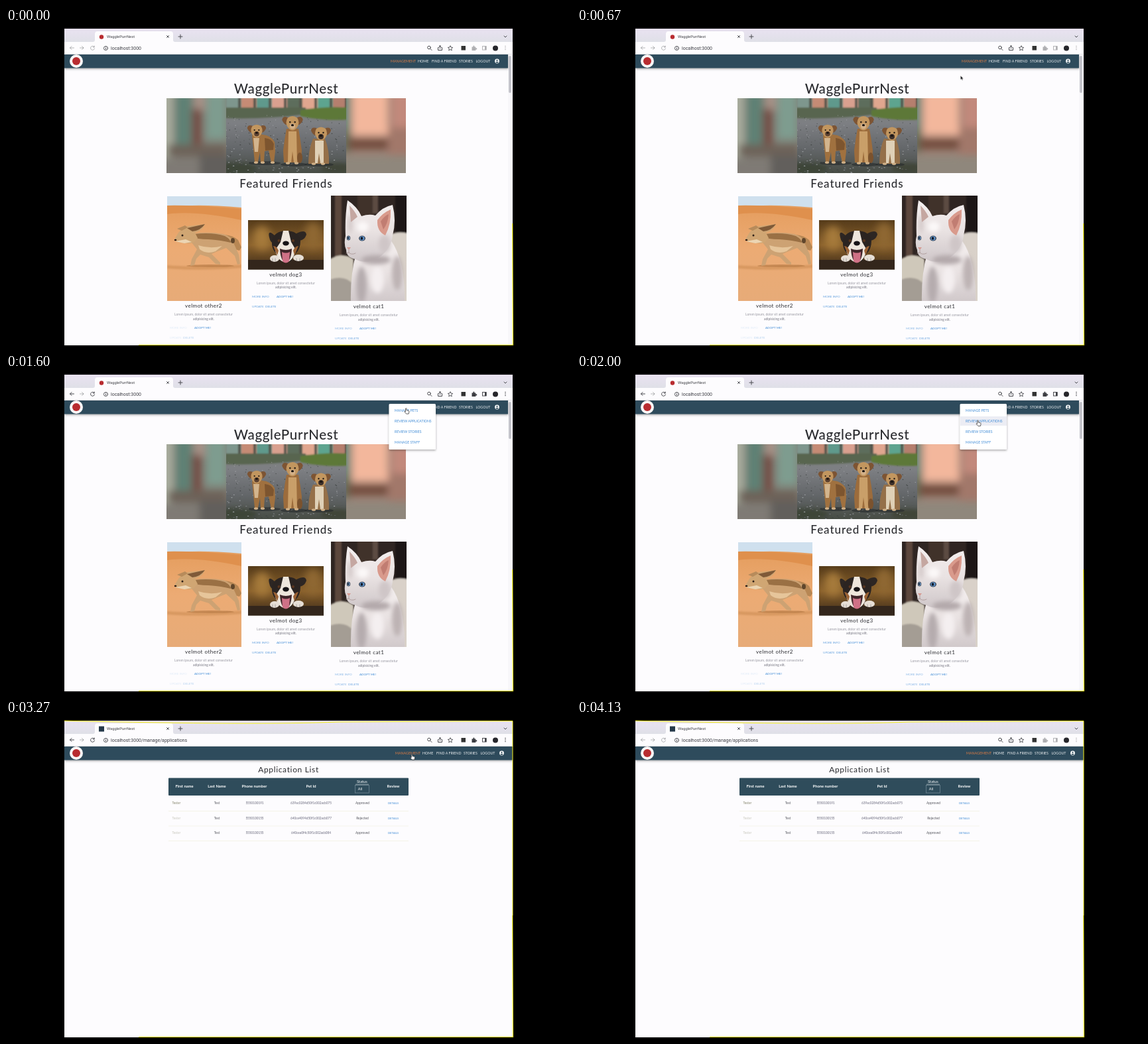
An HTML page for the animation above (4.19 s loop, 852 by 480 pixels).

```html
<!DOCTYPE html>
<html lang="en">
<head>
<meta charset="utf-8">
<title>Pet adoption walkthrough</title>
<style>
  html, body { margin: 0; width: 100%; height: 100%; overflow: hidden; background: #000; }
  svg { display: block; width: 100vw; height: 100vh; }
  text { font-family: Lato, "Open Sans", sans-serif; }
  .ui { font-family: Roboto, Inter, sans-serif; }
  .line { fill: none; stroke: #4a4b50; stroke-width: 1; stroke-linecap: round; }
</style>
</head>
<body>
<svg id="stage" viewBox="0 0 852 480"></svg>
<script>
const LOOP = 4190;
const BRAND = 'WagglePurrNest';
const NAVY = '#2f4c5b', INK = '#2b2c30', BLUE = '#3f8bd6', GREY = '#777782';
const stage = document.getElementById('stage');

const rect = (x, y, w, h, fill, more = '') =>
  `<rect x="${x}" y="${y}" width="${w}" height="${h}" fill="${fill}" ${more}/>`;
const dot = (x, y, rx, fill, ry = rx, more = '') =>
  `<ellipse cx="${x}" cy="${y}" rx="${rx}" ry="${ry}" fill="${fill}" ${more}/>`;
const shape = (d, fill, more = '') => `<path d="${d}" fill="${fill}" ${more}/>`;
const line = (d, more = '') => `<path class="line" d="${d}" ${more}/>`;
const blurred = (id, art) => `<g filter="url(#${id})">${art}</g>`;
const label = (x, y, str, size, fill = INK, more = '') =>
  `<text x="${x}" y="${y}" font-size="${size}" fill="${fill}" ${more}>${str}</text>`;
const mid = (x, y, str, size, fill = INK, more = '') =>
  label(x, y, str, size, fill, `text-anchor="middle" ${more}`);
const title = (x, y, str, size, weight = 400, spacing = 0.055) =>
  mid(x, y, str, size, INK, `font-weight="${weight}" letter-spacing="${spacing}em"`);
const clip = (id, x, y, w, h, art) =>
  `<clipPath id="${id}">${rect(x, y, w, h, '#000')}</clipPath><g clip-path="url(#${id})">${art}</g>`;

function seeded(seed) {
  return () => (seed = (seed * 16807) % 2147483647) / 2147483647;
}

function specks(count, x, y, w, h, colors) {
  const rnd = seeded(71);
  let out = '';
  for (let i = 0; i < count; i++) {
    const depth = rnd();
    out += dot((x + rnd() * w).toFixed(1), (y + depth * h).toFixed(1),
      (0.5 + depth * 0.9).toFixed(1), colors[i % colors.length], 0.6);
  }
  return out;
}

const gradient = (id, ...stops) =>
  `<linearGradient id="${id}" x1="0" y1="0" x2="0" y2="1">${stops.map((c, i) =>
    `<stop offset="${i / (stops.length - 1)}" stop-color="${c}"/>`).join('')}</linearGradient>`;
const blur = (id, amount) =>
  `<filter id="${id}" x="-30%" y="-30%" width="160%" height="160%"><feGaussianBlur stdDeviation="${amount}"/></filter>`;

const defs = `<defs>
  ${gradient('ground', '#7b8078', '#7d7f83', '#64676a', '#474c45')}
  ${gradient('sand', '#e39a59', '#ecab74', '#e7ab78')}
  ${gradient('wood', '#553b1a', '#8a612c', '#3a2917')}
  ${gradient('fur', '#f4efef', '#e9e2e2', '#cfc7c9')}
  ${gradient('strip', '#e9e2f1', '#dfe0e7')}
  ${blur('blur', 6)}${blur('haze', 3)}${blur('soft', 1.2)}${blur('lens', 0.5)}
  <filter id="shade" x="-20%" y="-20%" width="140%" height="150%">
    <feDropShadow dx="0" dy="1.5" stdDeviation="1.6" flood-color="#333" flood-opacity=".4"/></filter>
</defs>`;

function browser() {
  return rect(88, 1, 676, 478, '#fdfcfe') + rect(88, 1, 676, 20, 'url(#strip)') +
    shape('M131 21q3 0 3-3V9q0-4 4-4h110q4 0 4 4v9q0 3 3 3z', '#fdfcfe') +
    '<g id="favicon"></g>' +
    label(152, 15.3, BRAND, 5.8, '#44454a', 'class="ui"') +
    line('M242.5 11.5l3 3m0-3l-3 3M260 13h6m-3-3v6M751 12l2 2 2-2') +
    line('M88 39.5h676', 'style="stroke:#d9d8de;stroke-width:.6"') +
    `<g id="dimmable">
      ${line('M102.500 30h-6m2.500-2.500l-2.500 2.500 2.500 2.500M133 28.500a3 3 0 1 0 .5 2.500m-.3-4v2h-2')}
      ${shape('M702.500 28.500h2q-.6-2 .9-2t.9 2h2v2q2-.6 2 .9t-2 .9v1.700h-5.800z', '#3c3d42')}
      <rect class="line" x="718.500" y="27.500" width="5.500" height="5.500"/>${rect(722, 27.5, 2.5, 5.5, '#3c3d42')}
      ${[27.5, 30, 32.5].map(y => dot(753, y, 0.75, '#3c3d42')).join('')}
    </g>` +
    line('M111.500 30h5.500m-2.500-2.500l2.500 2.500-2.500 2.500', 'opacity=".4"') +
    '<circle class="line" cx="150.500" cy="30.500" r="3"/>' + line('M150.500 30.500v1.300m0-3v.1') +
    '<text id="url" class="ui" x="158" y="33" font-size="7" fill="#3d3e44"></text>' +
    '<circle class="line" cx="638" cy="29.500" r="2.300"/>' + line('M640 31.500l2 2') +
    line('M652.500 29.500h-1v4h6v-4h-1m-2 1.500v-4.500m-1.500 1.500l1.500-1.500 1.500 1.500') +
    shape('M670 26.700l1.100 2.400 2.600.3-2 1.800.6 2.600-2.300-1.300-2.300 1.300.6-2.600-2-1.800 2.600-.3z',
      'none', 'stroke="#4a4b50" stroke-width=".9"') +
    rect(686.5, 27, 6.5, 6.5, '#333') + dot(738, 30.5, 4, '#26262b');
}

function navbar() {
  const items = [[580, 'MANAGEMENT', '#dd7c45'], [621, 'HOME'], [642, 'FIND A FRIEND'], [683, 'STORIES'], [708.5, 'LOGOUT']];
  return rect(88, 40, 676, 20.5, NAVY, 'id="bar" filter="url(#shade)"') +
    dot(106, 50, 10, '#faf7f7') + dot(106, 50, 6, '#b82c30') +
    '<g id="nav">' + items.map(([x, s, c]) => label(x, 51.7, s, 5.3, c || '#edf0f2')).join('') +
    dot(740.5, 50, 3.4, '#fff') + dot(740.5, 48.9, 1.1, NAVY) + dot(740.5, 51.7, 2, NAVY, 1) + '</g>';
}

function bannerPhoto() {
  const left = clip('bl', 242, 106, 90, 113, rect(242, 106, 90, 113, '#807f76') + blurred('blur',
    rect(230, 96, 22, 100, '#a9ad9f') + rect(256, 96, 24, 84, '#5f8175') +
    rect(284, 96, 16, 30, '#a79186') + rect(302, 96, 30, 72, '#7e9c8f') +
    rect(280, 122, 15, 66, '#764e45') + rect(244, 176, 90, 18, '#6d6259') +
    rect(232, 196, 60, 34, '#7f7a74') + rect(292, 192, 50, 38, '#625f5b')));
  const right = clip('br', 513, 106, 90, 113, rect(513, 106, 90, 113, '#a08377') + blurred('blur',
    rect(500, 96, 18, 60, '#5f8a7b') + rect(500, 152, 20, 36, '#66735f') +
    rect(522, 96, 54, 66, '#f3b79c') + rect(582, 96, 34, 70, '#c2897b') +
    rect(515, 166, 66, 18, '#74503f') + rect(576, 150, 36, 42, '#a2786a') +
    rect(500, 192, 112, 40, '#8f877b')));

  const walls = ['#7e968d', '#c58b75', '#5f998c', '#d9a08f', '#5d6d5c', '#e0a68f', '#5da48f', '#b57f6e'];
  const head = (x, y, s, face) => `<g transform="translate(${x} ${y}) scale(${s})">
    ${shape('M-5-7q-9-4-10 3 3 7 7 7zM5-7q9-4 10 3-3 7-7 7z', '#7d5433')}
    ${shape('M-7-7q7-5 14 0 4 7 0 13-7 10-14 0-4-6 0-13z', '#c2965f')}
    ${dot(0, 5, 4, face)}${dot(-3.5, -1, 1.2, '#211a16')}${dot(3.5, -1, 1.2, '#211a16')}
    ${dot(0, 3.5, 2, '#17120f', 1.5)}</g>`;
  const paws = (xs, y) => xs.map(x => dot(x, y, 3.2, '#cfb088', 1.8)).join('');
  const shadow = (x, y, rx) => dot(x, y, rx, '#25282a', 3, 'opacity=".6"');
  const dogs = shadow(390, 204, 24) + shadow(434, 206, 20) + shadow(472, 206, 22) +
    shape('M371 162q6-5 16-1 12 1 18 11l1 14-2 17h-4l-4-18-6 1-1 17h-5l-1-16-3 15h-5z', '#a0713f') +
    shape('M390 166q11 1 14 9l-1 9-12 1z', '#7d552f') + shape('M373 166h9l-2 21h-5z', '#d3b58e') +
    head(378, 155, 0.95, '#5c4130') + paws([377, 387, 402], 203) +
    shape('M423 152h18q3 16 5 33l-1 18h-26l-1-18q2-18 5-33z', '#9c6c3c') +
    shape('M426 156h12l1 47h-5l-2-17-2 17h-5z', '#c99f69') + dot(443, 196, 4, '#7b522d', 8) +
    head(432, 143, 1.05, '#d2b089') + paws([425, 438], 204) +
    shape('M463 167h18q7 18 6 38h-31q0-22 7-38z', '#957049') +
    shape('M466 170h13v34h-5l-2-15-2 15h-4z', '#dfd0b6') +
    head(475, 159, 1, '#3d302a') + paws([464, 478], 205);
  const center = clip('bc', 332, 106, 181, 113,
    rect(332, 106, 181, 113, 'url(#ground)') +
    blurred('soft', walls.map((c, i) => rect(332 + i * 23, 104, 24, 18, c) + rect(350 + i * 23, 104, 4, 18, '#55564d')).join('') +
      shape('M330 120h122v10q-60 8-122 6z', '#59654f') + shape('M444 124q34-6 72-4v18q-35 3-72-5z', '#5d7838')) +
    blurred('haze', dot(345, 212, 34, '#3c4438', 9) + dot(500, 212, 26, '#3f4538', 8)) +
    specks(260, 332, 132, 181, 87, ['#a2a4a8', '#3f4343', '#888a8e', '#5a5e5d']) + blurred('lens', dogs));
  return left + right + center;
}

function foxPhoto() {
  const fox = dot(308, 359, 36, '#b0733f', 2, 'opacity=".6"') +
    shape('M330 312q12 1 20 8l5 11-3 5q-14-3-23-14z', '#b78754') +
    shape('M284 310q22-3 44 1 13 4 15 13l8 18 2 14-4 1-4-13-13-12-13 5-9 4 13 13v3l-7-1-10-10-13-4-6 6-3 10-6 1 2-10 8-15-8-10z', '#cda273') +
    shape('M284 311q28-3 46 3 9 5 9 10-16-4-34-5-17 0-24-4z', '#9a7044') +
    shape('M290 328q18 6 36 1l-10 8q-14 5-24-3z', '#e6c59a') +
    shape('M254 319l6-10q6-8 15-10l25-3q-4 10-15 13l4 8q-6 9-14 8l-17-2z', '#d0a673') +
    shape('M273 302l27-6q-7 10-19 11z', '#7f5a38') + shape('M258 303l12-5 4 3-9 5z', '#b78b5b') +
    shape('M255 322l16-3 9 4-11 2z', '#ecd5b3') +
    dot(266, 313, 1.5, '#2e2018') + dot(255.5, 320, 1.8, '#2e2018', 1.3) + dot(342, 321, 3, '#60462c', 4);
  return clip('fox', 243, 254, 112, 158,
    rect(243, 254, 112, 158, 'url(#sand)') +
    blurred('lens', shape('M243 254h112v17q-48-4-75-3-20 1-37 1z', '#cfe0ee') +
      shape('M243 268q35-1 112 5v17q-70-15-112-9z', '#df904d')) +
    blurred('soft', shape('M243 358q60 5 112-1v5q-60 5-112 1z', '#cc8c53', 'opacity=".6"')) + blurred('lens', fox));
}

function dogPhoto() {
  const dog = shape('M405 313q-11-10-8 3 2 11 11 9zM438 310q14-7 15 2-4 11-14 8z', '#2d2623') +
    shape('M401 321q3-14 21-15 19 0 22 15 0 13-7 19l-7 12h-16l-7-12q-7-7-6-19z', '#2b2421') +
    shape('M418 306h8l4 17 7 12q-4 17-15 19-13-2-16-19l8-12z', '#eee6dc') +
    shape('M403 329q5 0 8 7l-2 7zM441 329q-5 0-8 7l2 7z', '#9b6234') +
    dot(411.5, 321, 2, '#5a361f') + dot(433, 321, 2, '#5a361f') +
    dot(422, 325, 4.8, '#171416', 3.4) + shape('M413 333q9 4 18 0-1 19-9 22-8-3-9-22z', '#40262a') +
    shape('M416 338q6 3 12 0l-1 14q-5 5-10 0z', '#cf7186') +
    dot(405, 348, 7, '#e7dfd6', 5) + dot(441, 347, 8, '#e7dfd6', 5) +
    line('M402 348v4m4-4v4M438 348v4m5-4v4', 'opacity=".4"');
  return clip('dog', 365, 290, 114, 74.5,
    rect(365, 290, 114, 75, 'url(#wood)') +
    blurred('blur', dot(386, 317, 13, '#a67a3b', 18) + dot(463, 313, 13, '#8f6833', 20)) +
    rect(365, 350, 114, 15, '#33261c') + blurred('lens', dog));
}

function catPhoto() {
  const backdrop = rect(496, 250, 10, 96, '#5b463d') + rect(530, 250, 24, 45, '#40322c') +
    rect(553, 250, 8, 30, '#5b4b43') + rect(587, 250, 20, 66, '#1d1918');
  const couch = shape('M488 349q20-12 36 0v63h-36z', '#cfc8ba') + shape('M488 380q20-8 34 5v30h-34z', '#a49d94') +
    shape('M578 312q14-6 28-2v104h-34z', '#d9d1c9');
  const cat = shape('M528 340l52-20q22 30 21 95h-81q-1-44 8-75z', 'url(#fur)') +
    shape('M515 260q15 10 21 24 12-4 21-1 11-13 26-16 6 24 0 46-2 20-20 33-20 12-36 3-14-3-14-14-4-9-1-21-1-30 3-54z', 'url(#fur)');
  const shading = dot(558, 350, 22, '#b3a9ab', 7) + dot(536, 388, 8, '#b5acae', 28) +
    dot(590, 370, 8, '#bdb3b4', 26) + dot(571, 326, 9, '#cfc6c7', 14) + dot(519, 296, 3, '#cfc4c4', 14) +
    dot(560, 380, 10, '#f4eff0', 20) + dot(538, 300, 9, '#fbf8f8', 8);
  const face = shape('M518 268q8 8 12 17l-10 8z', '#c5a7a1') + shape('M560 290q8-11 20-16 1 22-8 39-13-6-12-23z', '#d99a8c') +
    shape('M565 292q5-8 12-11-1 14-8 23z', '#b06a60', 'opacity=".6"') +
    dot(516.5, 317, 2.8, '#4a5360', 3.6) + dot(516.5, 317, 2, '#6a97c8', 2.6) + dot(516, 317, 1, '#101621', 1.8) +
    dot(537, 317.5, 5, '#3c4450', 4) + dot(537, 317.5, 3.6, '#5d8fc6', 3.2) + dot(536.5, 317.5, 1.7, '#101621', 2.2) +
    shape('M514 331h6l-3 4z', '#d69a92') + line('M517 335v4q4 4 10 1m-10-1l-4 1', 'style="stroke:#a89492;stroke-width:.8"');
  return clip('cat', 490, 253, 114, 159, rect(490, 253, 114, 159, '#2f2522') +
    blurred('soft', backdrop + couch) + blurred('lens', cat) + blurred('haze', shading) + blurred('lens', face));
}

function card(x, y, name, faded) {
  const link = (dx, dy, s, opacity = 1) =>
    label(x - 51 + dx, y + dy, s, 4.6, BLUE, `opacity="${opacity}"`);
  return title(x, y, name, 8.1) +
    mid(x, y + 12, 'Lorem ipsum, dolor sit amet consectetur', 5, GREY, 'opacity=".75"') +
    mid(x, y + 18.5, 'adipisicing elit.', 5, GREY) +
    link(0, 32, 'MORE INFO', faded) + link(37, 32, 'ADOPT ME!') +
    link(0, 47, 'UPDATE', faded) + link(20, 47, 'DELETE', faded ** 0.5);
}

function homePage() {
  return '<g id="home">' + rect(757, 40, 7, 439, '#f8f7fa') + rect(758, 42, 4, 56, '#c4c4cb', 'rx="2"') +
    title(422.5, 99, BRAND, 20.6, 500, 0.03) + bannerPhoto() + title(422.5, 240.5, 'Featured Friends', 17, 500) +
    foxPhoto() + dogPhoto() + catPhoto() +
    card(298, 422, 'velmot other2', 0.15) + card(422, 374.5, 'velmot dog3', 0.8) + card(547, 423, 'velmot cat1', 0.6) + '</g>';
}

function listPage() {
  const heads = [[269, 'First name'], [318, 'Last Name'], [374.5, 'Phone number'], [460, 'Pet Id'], [584, 'Review']];
  const rows = [
    ['5550100191', '639ac0284d50f1c002acb075', 'Approved'],
    ['5550100155', '640ce4094d50f1c002acb077', 'Rejected'],
    ['5550100155', '640cea0f4c50f1c002acb084', 'Approved']
  ];
  return '<g id="list">' + title(426, 79, 'Application List', 12) + rect(245, 87.5, 362, 26.5, NAVY, 'rx="1"') +
    heads.map(([x, s]) => mid(x, 102.3, s, 5.8, '#fff', 'font-weight="700"')).join('') +
    mid(537, 95.2, 'Status', 5.8, '#fff') + rect(527, 96.8, 20, 0.6, '#dce3e6') +
    rect(526.5, 98.5, 21, 11.5, 'none', 'stroke="#8298a3" stroke-width=".6"') + mid(534, 106, 'All', 5.5, '#fff') +
    rows.map(([phone, id, status], i) => {
      const y = 127 + i * 22.7;
      return label(250.5, y, 'Tester', 4.8, '#77775c', `opacity="${i ? 0.4 : 0.9}"`) +
        mid(318, y, 'Test', 4.8, '#55565e') + mid(375, y, phone, 4.7, '#606174') +
        mid(460, y, id, 4.7, '#66667a') + mid(537.5, y, status, 4.9, '#55565e') +
        mid(584, y, 'DETAILS', 4.2, BLUE) + rect(245, y + 10, 362, 0.6, '#efeeda');
    }).join('') + '</g>';
}

function dropdown() {
  const items = ['MANAGE PETS', 'REVIEW APPLICATIONS', 'REVIEW STORIES', 'MANAGE STAFF'];
  return '<g id="menu">' + rect(577.5, 45, 70.5, 69, '#fff', 'rx="1.5" filter="url(#shade)"') +
    rect(578, 64, 70, 14, '#ecedf4', 'id="hover"') +
    items.map((s, i) => label(586, 57 + i * 16, s, 5.1, BLUE)).join('') + '</g>';
}

const fringe = '<g fill="none" stroke="#f6f21a">' +
  '<path d="M763.700 295L764.500 478.500H200" stroke-width="1.200"/>' +
  '<path id="fringe" d="M88 1.200Q380 8 500 3L764 1.500V295" stroke-width="1"/></g>';

const pointer = '<g id="pointer">' +
  shape('M0 0v6l1.500-1.200 1 2.200 1-.5-1-2.100h2z', '#17171a', 'id="arrow" stroke="#fff" stroke-width=".4"') +
  shape('M-.8 4V0q.8-1.200 1.600 0v2.600l3 .7q1 .3.800 1.500l-.7 3.200H.3L-2.300 5q-.2-1.500 1.500-.3z', '#fff',
    'id="hand" stroke="#222" stroke-width=".7"') + '</g>';

stage.innerHTML = defs + rect(0, 0, 852, 480, '#000') + browser() + homePage() + listPage() +
  navbar() + dropdown() + fringe + pointer;

const el = id => document.getElementById(id);
const show = (id, on) => el(id).setAttribute('display', on ? 'inline' : 'none');

// time, x, y of the pointer tip
const route = [[400, 572, 84], [600, 578, 72], [720, 578.5, 72], [1060, 603, 47.5], [1500, 603, 47.5],
  [1850, 604.5, 70.5], [2270, 604.5, 70.5], [2480, 611, 72], [2640, 611, 72], [3000, 612, 52], [3800, 612, 52]];

function pointerAt(t) {
  const next = route.findIndex(p => p[0] > t);
  const i = next < 0 ? route.length - 1 : Math.max(1, next);
  const [a, b] = [route[i - 1], route[i]];
  const u = Math.min(1, Math.max(0, (t - a[0]) / (b[0] - a[0])));
  const ease = u * u * (3 - 2 * u);
  return [a[1] + (b[1] - a[1]) * ease, a[2] + (b[2] - a[2]) * ease];
}

function render(t) {
  const onList = t >= 2200;
  const menuOpen = t >= 1470 && !onList;
  const [x, y] = pointerAt(t);
  const overLink = y < 60 || menuOpen;

  show('home', !onList);
  show('list', onList);
  show('menu', menuOpen);
  show('hover', t >= 1730);
  show('fringe', onList);
  el('bar').setAttribute('width', onList ? 676 : 669);
  el('nav').setAttribute('transform', `translate(${onList ? 7 : 0} 0)`);
  el('url').textContent = 'localhost:3000' + (onList ? '/manage/applications' : '');
  el('favicon').innerHTML = onList ? rect(140, 9.5, 8, 8, '#25394a') : dot(144, 13.5, 3.2, '#b82c30');
  el('dimmable').setAttribute('opacity', t < 800 || t >= 3800 ? 0.4 : 1);

  show('pointer', t >= 400 && t < 3800);
  show('arrow', !overLink);
  show('hand', overLink);
  el('pointer').setAttribute('transform', `translate(${x.toFixed(2)} ${y.toFixed(2)})`);
}

const start = performance.now();
function tick() {
  render((performance.now() - start) % LOOP);
  requestAnimationFrame(tick);
}
tick();
</script>
</body>
</html>
```
